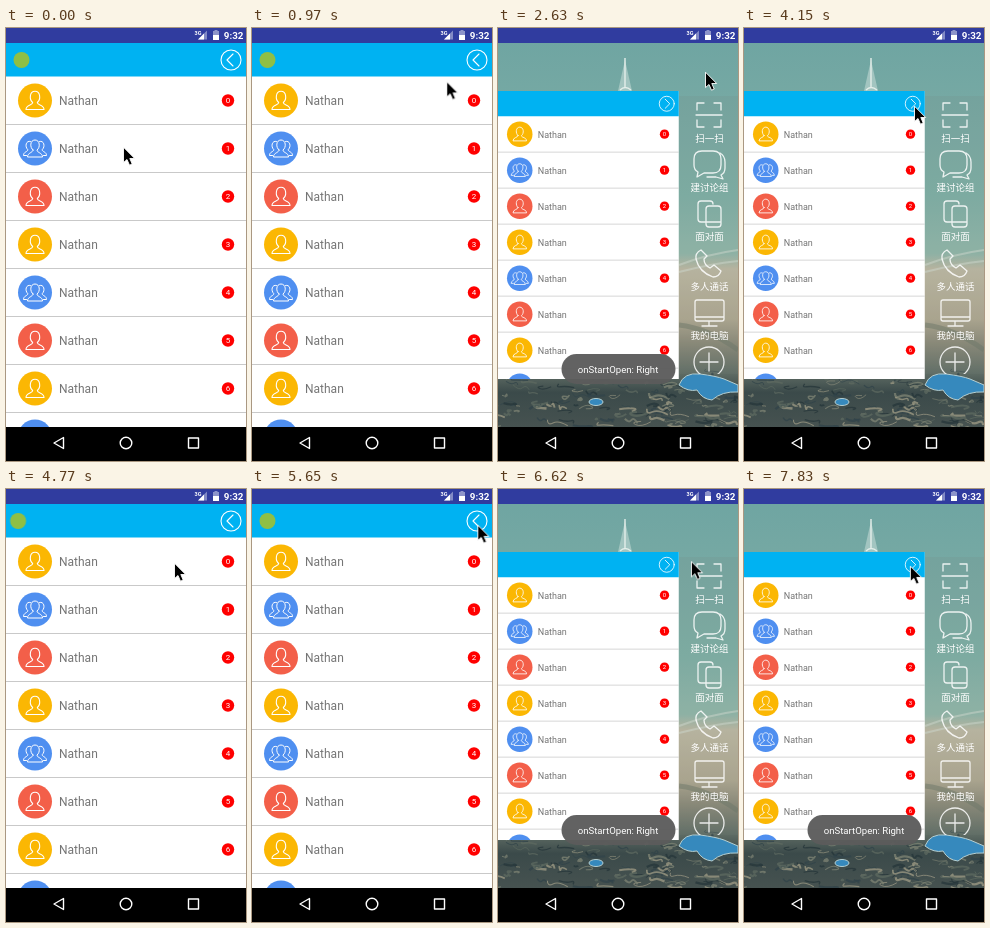
Recreate the animation shown at these times as an HTML page. Size 240x433 px, loop 8000 ms.

```html
<!DOCTYPE html>
<html lang="en">
<head>
<meta charset="utf-8">
<title>Sliding drawer</title>
<style>
@property --open { syntax: "<number>"; inherits: true; initial-value: 0; }
html, body { margin: 0; width: 100%; height: 100%; overflow: hidden; background: #000; }
svg { display: block; width: 100vw; height: 100vh; font-family: Roboto, sans-serif; }
#screen { animation: drawer 8s step-end infinite; }
#shade { opacity: calc(1 - var(--open)); }
#panel { transform-origin: 0 207px; transform: scale(calc(1 - .25 * var(--open))); }
#menu {
  opacity: var(--open);
  transform-origin: 181px 207px;
  transform: translateX(calc(104px * (1 - var(--open)))) scale(calc(.5 + .5 * var(--open)));
}
#logo { opacity: calc(1 - var(--open)); animation: shake 8s step-end infinite; }
#arrow-open { opacity: clamp(0, (var(--open) - .3) * 1000, 1); }
#arrow-closed { opacity: clamp(0, (.3 - var(--open)) * 1000, 1); }
#toast { animation: toast 8s linear infinite; }
#pointer { animation: pointer 8s linear infinite; }
.line { fill: none; stroke: #fff; stroke-linecap: round; stroke-linejoin: round; }
.label { font: 9.5px "Noto Sans CJK SC", "Noto Sans CJK", sans-serif; fill: #fff; text-anchor: middle; }
.name { font-size: 12px; fill: #757575; }
.count { font-size: 8px; fill: #fff; text-anchor: middle; }

@keyframes drawer {
  0% { --open: 0; }
  20.87% { --open: .667; }
  22% { --open: .934; }
  23% { --open: .992; }
  24.1% { --open: 1; }
  54% { --open: .45; }
  55% { --open: .1; }
  56.1% { --open: .015; }
  57.2% { --open: 0; }
  74% { --open: .5; }
  75% { --open: .885; }
  76.1% { --open: .985; }
  77.2%, 100% { --open: 1; }
}
@keyframes shake {
  0% { transform: none; }
  58.4% { transform: translateX(-2px); }
  59.5% { transform: translateX(-3.4px); }
  60.7% { transform: translateX(3px); }
  61.7% { transform: translateX(-1px); }
  62.8% { transform: translateX(-3.4px); }
  64% { transform: translateX(3px); }
  65.1% { transform: translateX(-3.4px); }
  66.2%, 100% { transform: none; }
}
@keyframes toast {
  0%, 22% { opacity: 0; }
  27%, 46% { opacity: 1; }
  50%, 76.2% { opacity: 0; }
  81.5%, 100% { opacity: 1; }
}
@keyframes pointer {
  0%, .9% { transform: translate(117px, 119px); }
  3.2%, 4.9% { transform: translate(142px, 84px); }
  15.3% { transform: translate(217px, 40px); }
  16.3%, 20.9% { transform: translate(223px, 28px); }
  28.5%, 31.7% { transform: translate(209px, 44px); }
  32.8%, 42.5% { transform: translate(207px, 44px); }
  51.8%, 54% { transform: translate(170px, 78px); }
  59.5%, 60.5% { transform: translate(168px, 74px); }
  64% { transform: translate(226px, 47px); }
  66.2%, 68% { transform: translate(226px, 43px); }
  71.7%, 75% { transform: translate(225px, 33px); }
  83.7% { transform: translate(189px, 77px); }
  85.8%, 87.5% { transform: translate(203px, 120px); }
  95.6%, 97.7% { transform: translate(164px, 76px); }
  97.9%, 100% { transform: translate(166px, 77px); }
}
</style>
</head>
<body>
<svg viewBox="0 0 240 433" preserveAspectRatio="none">
  <defs>
    <linearGradient id="sea" x2="0" y2="1">
      <stop offset="0" stop-color="#6fa5a2"/>
      <stop offset=".2" stop-color="#78aaa4"/>
      <stop offset=".4" stop-color="#7fb2a8"/>
      <stop offset=".55" stop-color="#93baac"/>
      <stop offset=".59" stop-color="#c2bca5"/>
      <stop offset=".72" stop-color="#b3aa92"/>
      <stop offset=".78" stop-color="#8e8b79"/>
      <stop offset=".86" stop-color="#5f6c64"/>
      <stop offset=".91" stop-color="#3b4a4a"/>
      <stop offset="1" stop-color="#465250"/>
    </linearGradient>
    <clipPath id="content"><path d="M0 15H242V399H0Z"/></clipPath>
    <clipPath id="menu-box"><path d="M181 68H240V346H181Z"/></clipPath>
    <g id="person" class="line" stroke-width="1.1">
      <path d="M-2.3 2C-6-1-5.5-9.3 0-9.3S6-1 2.3 2C2.3 5 9 4 9 9H-9C-9 4-2.3 5-2.3 2Z"/>
    </g>
    <g id="group" class="line" stroke-width="1">
      <path d="M-2 1.5C-5.5-1-5-8.5 0-8.5S5.5-1 2 1.5C2 4.5 7.5 4 7.5 8.5H-7.5C-7.5 4-2 4.5-2 1.5Z"/>
      <path id="side" d="M4.5-7C9-8.5 10.5-2 7.2 1.2C7.2 3.5 11.5 3 11.5 7H8.5"/>
      <use href="#side" transform="scale(-1 1)"/>
    </g>
  </defs>

  <g id="screen">
    <g clip-path="url(#content)">
      <path fill="url(#sea)" d="M0 14H240V399H0Z"/>
      <path d="M127 32L120 63H134Z" fill="#dce9e4" opacity=".45"/>
      <path d="M127 30V60M122 62Q127 57 133 62" fill="none" stroke="#e4eeea" stroke-width="1.4"/>
      <g fill="none" stroke="#dce5da" stroke-width="2" opacity=".5">
        <path d="M181 237Q210 226 240 222M181 244Q212 236 240 233"/>
        <path d="M181 297Q210 300 240 322" stroke="#6d7767" stroke-width="5"/>
      </g>
      <g id="town"></g>
      <g fill="#3689bd" stroke="#b5ced0" stroke-width="1">
        <path d="M181 357Q186 344 202 346T226 351L240 357V364Q224 363 214 372Q204 371 199 362Q190 364 181 357Z"/>
        <ellipse cx="98" cy="374" rx="7" ry="3.5"/>
      </g>
      <path id="shade" d="M0 14H240V399H0Z"/>

      <g id="menu">
        <g clip-path="url(#menu-box)">
          <path fill="#70807a" opacity=".15" d="M181 68H240V346H181Z"/>
          <g class="line" stroke-width="1.3" opacity=".85">
            <path d="M199 82V75H206M216 75H223V82M199 92V99H206M216 99H223V92M198 87H224"/>
            <path d="M204 123H215Q223 123 223 131V137Q223 145 215 145H206L199 149L200 144Q196 142 196 137V131Q196 123 204 123Z"/>
            <path d="M222 125Q227 128 227 134V140Q227 145 223 147L225 151L218 149H209"/>
            <path d="M208 194H203Q200 194 200 191V176Q200 173 203 173H212Q215 173 215 176M211 178H220Q223 178 223 181V196Q223 199 220 199H211Q208 199 208 196V181Q208 178 211 178ZM208 194H223"/>
            <path d="M203 222Q197 225 198 231Q201 244 215 249Q221 249 223 243L216 237L212 240Q206 237 206 231L209 228Z"/>
            <path d="M199 272H224Q226 272 226 274V291Q226 293 224 293H199Q197 293 197 291V274Q197 272 199 272ZM197 289H226M211 293V298M204 298H219"/>
            <circle cx="211" cy="334" r="15"/>
            <path d="M211 325V343M202 334H220"/>
          </g>
          <g id="labels"></g>
        </g>
      </g>

      <g id="panel">
        <g clip-path="url(#content)">
          <path fill="#fff" d="M0 15H241V399H0Z"/>
          <path fill="#00b2f2" d="M0 15H241V48.5H0Z"/>
          <circle id="logo" cx="15.5" cy="32" r="8" fill="#8fbf45"/>
          <g class="line" stroke-width="1.1">
            <circle cx="225" cy="32" r="10"/>
            <path id="arrow-closed" d="M227 26L221 32L227 38"/>
            <path id="arrow-open" d="M223 26L229 32L223 38"/>
          </g>
          <g id="rows"></g>
        </g>
      </g>
    </g>

    <path fill="#303c9f" d="M0 0H240V15H0Z"/>
    <g fill="#fff">
      <text x="188.5" y="6.5" font-size="5.5" font-weight="700">3G</text>
      <path opacity=".4" d="M192 11.5L201 2.5V11.5Z"/>
      <path d="M192 11.5L198 5.5V11.5Z"/>
      <path opacity=".45" d="M207 3H208.5V2H211.5V3H213V12H207Z"/>
      <path d="M207 7H213V12H207Z"/>
      <text x="217.8" y="10.8" font-size="9.8" font-weight="600">9:32</text>
    </g>

    <path d="M0 399H240V433H0Z"/>
    <g class="line" stroke-width="1.4">
      <path d="M48 415L57.5 409.5V420.5Z"/>
      <circle cx="120" cy="415" r="5.8"/>
      <path d="M182.5 410H192.5V420H182.5Z"/>
    </g>

    <g id="toast">
      <rect x="63.5" y="326" width="114" height="30" rx="15" fill="#5c5c5c" fill-opacity=".96"/>
      <text x="120" y="344.5" font-size="9.6" fill="#fff" text-anchor="middle">onStartOpen: Right</text>
    </g>
    <path id="pointer" d="M.5 .2V15.6L4 12.5L6.5 18.2L9.2 17L6.8 11.5H11.7Z" stroke="#fff" stroke-width=".9"/>
  </g>
</svg>
<script>
const fill = (id, count, draw) => {
  document.getElementById(id).innerHTML = Array.from({ length: count }, (_, i) => draw(i)).join("");
};

const colors = ["#fbb703", "#4f8ff0", "#f35f49"];
fill("rows", 8, i => {
  const y = 72.5 + 48 * i;
  return `<circle cx="29" cy="${y}" r="17" fill="${colors[i % 3]}"/>
    <use href="#${i % 3 === 1 ? "group" : "person"}" x="29" y="${y}"/>
    <text class="name" x="53" y="${y + 4.5}">Nathan</text>
    <circle cx="222" cy="${y}" r="6.2" fill="#f00"/>
    <text class="count" x="222" y="${y + 2.9}">${i}</text>
    <path stroke="#c9c9c9" d="M0 ${y + 24}H241"/>`;
});

const labels = ["扫一扫", "建讨论组", "面对面", "多人通话", "我的电脑"];
fill("labels", labels.length, i =>
  `<text class="label" x="211.5" y="${113.5 + 49.4 * i}">${labels[i]}</text>`);

// Scattered roofs and winding paths along the shore.
let seed = 7;
const random = () => (seed = seed * 16807 % 2147483647) / 2147483647;
const tones = ["#26353a", "#5d6a60", "#7f8474", "#30434a", "#a09c86"];
fill("town", 130, i => {
  const x = random() * 240, y = 344 + random() * 54;
  const dx = random() * 20 - 10, dy = random() * 14 - 7;
  return `<path d="M${x} ${y}q${dx} ${dy} ${dx * 1.6} ${dy / 2}t${dy} ${dx / 3}" fill="none" opacity=".75"
    stroke="${tones[i % 5]}" stroke-width="${.6 + random() * 1.8}"/>`;
});
</script>
</body>
</html>
```
